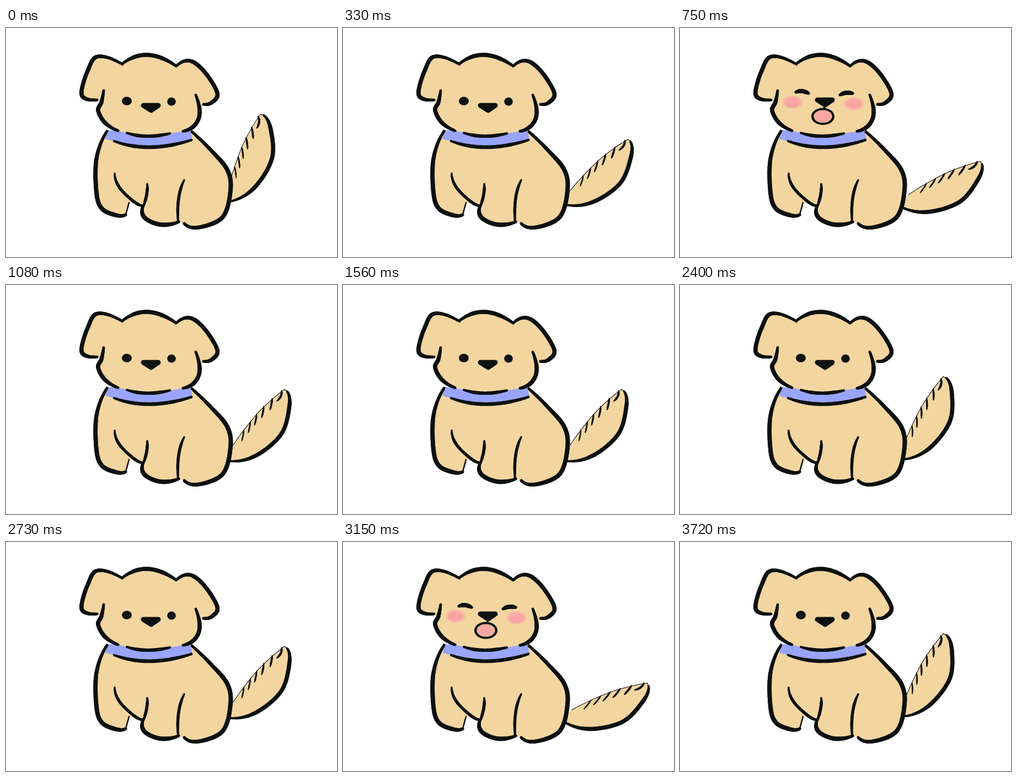
Recreate the animation shown at these times as an HTML page with a canvas. Size 600x417 px, loop 3.81 s.

```html
<!DOCTYPE html>
<html lang="en">
<head>
<meta charset="utf-8">
<title>Wagging puppy</title>
<style>
  html, body { margin: 0; width: 100%; height: 100%; overflow: hidden; background: #fff; }
  canvas { display: block; width: 600px; height: 417px; }
</style>
</head>
<body>
<canvas id="stage" width="600" height="417"></canvas>
<script>
const ctx = document.getElementById('stage').getContext('2d');
const LOOP = 3810, STEPS = 46, STEP_MS = 82.6, TICK = 30;
const INK = '#0d1110', FUR = '#f3d59f', BLUE = '#99a5fa', PINK = '#f8a6a4';

// Catmull-Rom through key points; the ends continue as parabolas
function curve(pts, detail = 12) {
  const last = pts.length - 1;
  if (last < 2) return pts;
  const extend = (a, b, c) => [0, 1].map(j => 3 * a[j] - 3 * b[j] + c[j]);
  const all = [
    extend(pts[0], pts[1], pts[2]), ...pts,
    extend(pts[last], pts[last - 1], pts[last - 2])
  ];
  const out = [];
  for (let i = 0; i < last; i++) {
    const [a, b, c, d] = all.slice(i, i + 4);
    for (let k = 0; k < detail; k++) {
      const t = k / detail;
      out.push([0, 1].map(j => b[j] + 0.5 * t * (c[j] - a[j] +
        t * (2 * a[j] - 5 * b[j] + 4 * c[j] - d[j] +
        t * (3 * b[j] - a[j] - 3 * c[j] + d[j])))));
    }
  }
  return [...out, pts[last]];
}

// Ink line that swells from its thin ends to the full width
function brush(pts, width, thin = 0.65) {
  const line = curve(pts), last = line.length - 1;
  ctx.strokeStyle = INK;
  ctx.lineCap = 'round';
  for (let i = 0; i < last; i++) {
    const u = i / last;
    ctx.lineWidth = width * Math.min(1, thin + 4 * (1 - thin) * Math.min(u, 1 - u));
    ctx.beginPath();
    ctx.moveTo(...line[i]);
    ctx.lineTo(...line[i + 1]);
    ctx.stroke();
  }
}

function fill(color, ...parts) {
  ctx.fillStyle = color;
  ctx.beginPath();
  parts.flatMap(p => curve(p)).forEach(p => ctx.lineTo(...p));
  ctx.fill();
}

function oval(color, x, y, rx, ry) {
  ctx.fillStyle = color;
  ctx.beginPath();
  ctx.ellipse(x, y, rx, ry, 0, 0, 2 * Math.PI);
  ctx.fill();
}

const back = pts => [...pts].reverse();

const head = {
  earL: [[211, 66], [166, 52], [148, 78], [137, 115], [143, 128], [165, 131]],
  earR: [[309, 69], [334, 60], [360, 80], [383, 118], [374, 135], [358, 139]],
  crown: [[211, 65], [257, 49], [308, 69]],
  cheekL: [[177, 114], [173, 135], [167, 150], [179, 172], [203, 187]],
  cheekR: [[344, 122], [351, 155], [342, 177], [321, 188]],
  chin: [[219, 191], [256, 197], [297, 192]]
};
const collar = [[196, 206], [262, 217], [336, 204]];
const body = {
  flank: [[183, 188], [164, 238], [164, 300], [174, 329], [200, 341], [217, 340]],
  legBack: [[217, 340], [223, 318]],
  paw: [[249, 323], [251, 345], [280, 358], [313, 353]],
  rump: [[337, 189], [371, 222], [401, 258], [407, 295], [393, 344], [350, 363], [323, 356]]
};
const creases = [
  [[197, 265], [206, 291], [233, 317], [249, 323]],
  [[256, 284], [255, 303], [249, 325]],
  [[323, 277], [313, 310], [312, 353]]
];
const tail = {
  pivot: [391, 311],
  outer: [[406, 316], [450, 291], [482, 238], [480, 185], [467, 159]],
  inner: [[461, 157], [434, 203], [417, 245], [403, 291]]
};

function drawTail(wag) {
  const [x, y] = tail.pivot;
  const squeeze = 1 - 0.02 * Math.sin(Math.PI * wag / 8);
  ctx.save();
  ctx.translate(x, y);
  ctx.rotate((6.5 * wag - 0.08 * wag * wag) * Math.PI / 180);
  ctx.scale(squeeze, squeeze);
  ctx.translate(-x, -y);
  fill(FUR, tail.outer, tail.inner);
  brush([tail.outer.at(-1), tail.inner[0]], 1.2, 1);
  brush(tail.inner, 1, 1);
  brush(tail.outer, 7.5, 0.5);

  // Fur tufts spaced along the inner edge
  const edge = curve(tail.inner);
  for (let i = 0; i < 6; i++) {
    const [px, py] = edge[2 + 5 * i];
    const lean = i ? 2 : -3;
    brush([[px + 1, py - 4], [px + 3, py + 6], [px + 2 + lean, py + 17]], 3.8 - 0.3 * i, 0.5);
  }
  ctx.restore();
}

function drawBody() {
  const { earL, earR, crown, cheekL, cheekR, chin } = head;
  const { flank, legBack, paw, rump } = body;
  fill(FUR, flank, legBack, paw, back(rump));
  fill(BLUE, [[184, 186], [180, 202]], collar, [[338, 204], [335, 188]]);
  fill(FUR, earL, cheekL.slice(1), chin, back(cheekR.slice(1)), back(earR), back(crown));

  Object.values(body).forEach(line => brush(line, line === legBack ? 4 : 7.8));
  creases.forEach(line => brush(line, 5.4));
  Object.values(head).forEach(line => brush(line, line === chin ? 6.2 : 7.4));
  brush(collar, 6.6);
}

function drawNose(y) {
  ctx.fillStyle = ctx.strokeStyle = INK;
  ctx.lineWidth = 9;
  ctx.lineJoin = 'round';
  ctx.beginPath();
  ctx.moveTo(249, y - 4);
  ctx.lineTo(276, y - 4);
  ctx.lineTo(263, y + 5);
  ctx.closePath();
  ctx.fill();
  ctx.stroke();
}

function blush(x, y) {
  ctx.save();
  ctx.translate(x, y);
  ctx.scale(1.55, 1);
  const glow = ctx.createRadialGradient(0, 0, 8, 0, 0, 13);
  glow.addColorStop(0, PINK);
  glow.addColorStop(1, 'rgba(248,166,164,0)');
  oval(glow, 0, 0, 13, 13);
  ctx.restore();
}

function drawCalmFace() {
  oval(INK, 219, 133, 9, 7.8);
  oval(INK, 300, 134, 7.8, 7.4);
  drawNose(145);
}

function drawHappyFace() {
  blush(204, 135);
  blush(315, 138);
  brush([[210, 117], [221, 115], [233, 119]], 7.5);
  brush([[290, 122], [301, 118], [313, 119]], 7.5);
  drawNose(135);
  brush([[262, 142], [261, 148]], 3.5, 1);
  oval(INK, 259, 161, 21, 15.5);
  oval(FUR, 259, 161, 16.5, 11.5);
  oval(PINK, 259, 161, 15, 11);
}

const stepStart = n => TICK * Math.round(n * STEP_MS / TICK);

function stepAt(ms) {
  let n = STEPS - 1;
  while (stepStart(n) > ms) n--;
  return n;
}

// One wide wag, a short one, then the same in reverse
function wagAt(step) {
  const m = Math.min(step, STEPS - step);
  return m <= 16 ? 8 - Math.abs(8 - m) : 4 - Math.abs(20 - m);
}

const origin = performance.now();

function tick() {
  const wag = wagAt(stepAt((performance.now() - origin) % LOOP));
  ctx.fillStyle = '#fff';
  ctx.fillRect(0, 0, 600, 417);
  drawTail(wag);
  drawBody();
  if (wag >= 5) drawHappyFace();
  else drawCalmFace();
  requestAnimationFrame(tick);
}
tick();
</script>
</body>
</html>
```
